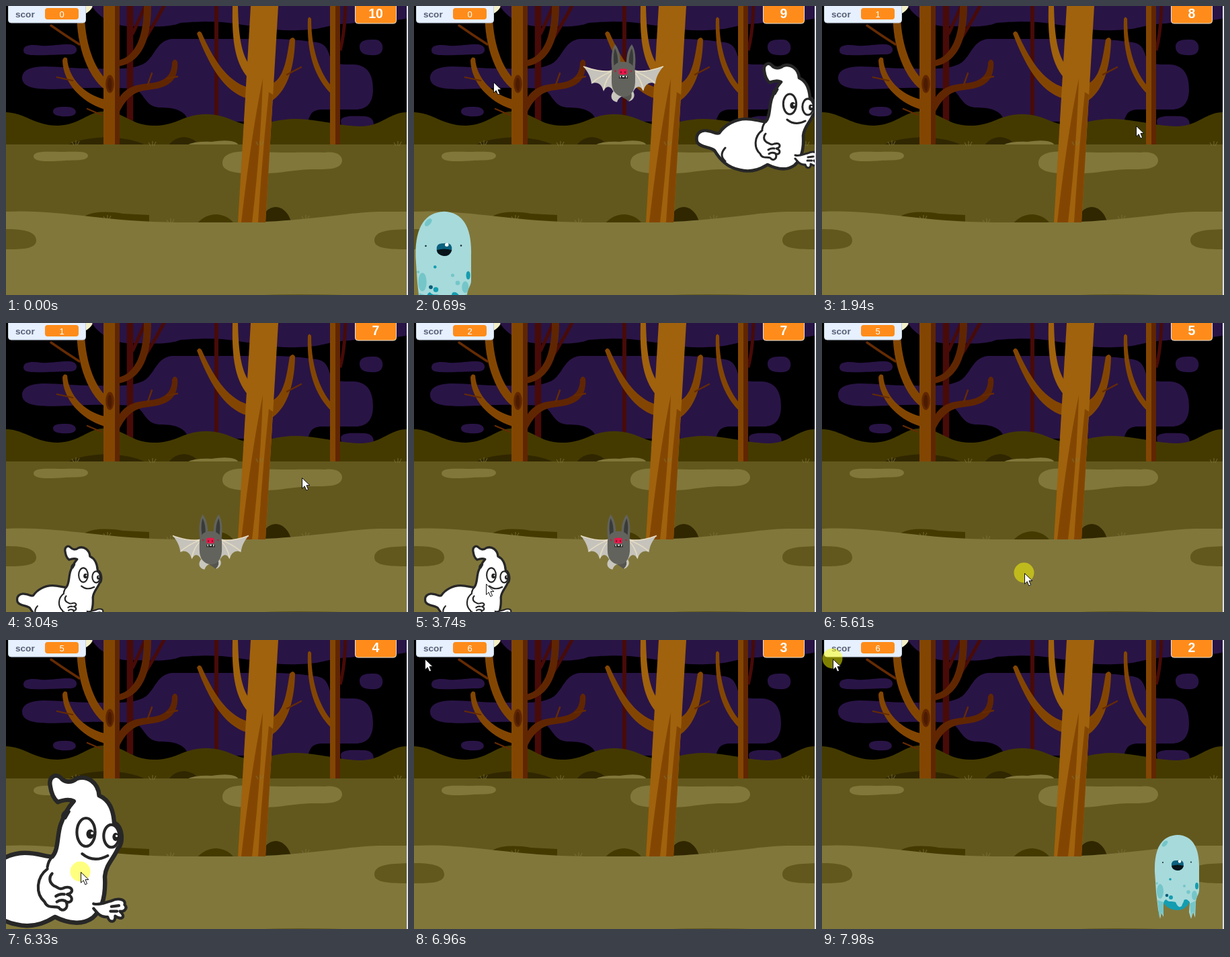
Write an HTML page that moves like this. It is 598 px wide and 430 px high and loops after 8 s.

```html
<!DOCTYPE html>
<html lang="ro">
<head>
<meta charset="utf-8">
<title>Night forest game</title>
<style>
html, body { margin: 0; width: 100%; height: 100%; overflow: hidden; background: #000; }
svg { display: block; width: 598px; height: 430px; }
text { font-family: "Liberation Sans", Arial, sans-serif; }
.cloud { fill: #291446; }
.hill { fill: #443a00; }
.deep { fill: #302700; }
.mid { fill: #62581d; }
.pale { fill: #81773b; }
.wood { fill: #834602; }
.lit { fill: #a0620c; }
.shade { fill: #602602; }
.far { fill: none; stroke: #480b08; }
.twig { fill: none; stroke: #662b03; stroke-linecap: round; }
.ink { fill: #fff; stroke: #272727; stroke-width: 4.6; stroke-linejoin: round; stroke-linecap: round; }
.thin { stroke-width: 3; }
.line { fill: none; }
</style>
</head>
<body>
<svg viewBox="0 0 598 430">
<defs>
  <path id="tuft" d="M0 3L-3-2M3 3V-4M5 3L8-3" fill="none" stroke="#81773b" stroke-width=".8"/>

  <g id="ghost">
    <path class="ink" d="M521 97C519 87 527 83 532 88C536 93 543 94 549 89C560 85 572 93 573 107C584 112 588 122 589 136C598 140 599 158 593 163C590 172 580 180 579 193C580 210 578 227 566 237C555 245 540 243 526 236C515 243 500 248 485 244C465 240 455 228 447 215C440 209 425 211 421 202C418 190 427 183 438 186C446 187 450 191 454 189C462 177 478 168 494 168C508 168 516 172 523 172C530 165 528 150 532 138C536 128 538 122 546 113C540 110 534 112 529 114C524 110 522 104 521 97Z"/>
    <path class="ink line thin" d="M534 129Q535 123 541 124L537 131M463 211Q453 222 463 231M524 171Q519 176 518 183M555 169Q567 179 582 171"/>
    <ellipse class="ink thin" cx="559" cy="146" rx="9.7" ry="15"/>
    <ellipse class="ink thin" cx="586" cy="150" rx="8.2" ry="12"/>
    <ellipse cx="563.5" cy="148" rx="4.2" ry="5" fill="#222"/>
    <ellipse cx="590.5" cy="151" rx="3.4" ry="4.4" fill="#222"/>
    <circle cx="565.5" cy="147" r="1.4" fill="#fff"/>
    <circle cx="591.5" cy="150" r="1.2" fill="#fff"/>
    <path class="ink thin" d="M518 185C506 194 505 211 515 220C518 228 526 224 530 226C534 232 541 227 538 220C544 222 547 215 539 212C547 211 545 202 536 205C530 208 529 204 525 203C519 199 520 193 523 190"/>
    <path class="ink line thin" d="M527 214Q531 211 536 212M528 220Q532 217 537 219"/>
    <path class="ink thin" d="M567 222C574 224 580 220 586 219C594 215 602 218 600 223C604 227 599 231 595 230C602 236 597 240 590 235C591 242 584 243 582 236C575 237 571 232 567 227"/>
    <path class="ink line thin" d="M586 225L594 224M585 230L592 230"/>
  </g>

  <g id="bat">
    <path fill="#c8c6bd" d="M301 124C291 129 291 141 302 143Q304 136 311 134Q318 136 320 142C329 139 331 129 321 123Z"/>
    <path fill="#55544f" d="M310 128L323 129Q326 136 319 142Q315 138 310 136Z"/>
    <g id="wing">
      <path fill="#c5c3bb" d="M252 90C268 96 284 100 297 94V128C293 119 286 117 282 127C279 115 271 112 264 116C263 105 258 97 252 90Z"/>
      <path fill="none" stroke="#e6dcc3" stroke-width="1.7" d="M252 90Q276 99 296 97Q280 102 265 114M296 98Q285 108 282 125"/>
      <path fill="#62625d" d="M295 99C292 78 294 64 299 57C306 65 308 79 307 95Z"/>
      <path fill="#393b39" d="M298 91C296 78 297 68 299 63C303 71 304 80 303 91Z"/>
    </g>
    <use href="#wing" transform="matrix(-1 0 0 1 623 0)"/>
    <path fill="#63635d" d="M294 99Q296 83 311 83Q327 83 329 99V114C328 129 320 136 311 135C301 134 294 126 294 113Z"/>
    <rect x="305" y="93.5" width="12" height="8.5" rx="2" fill="#eb1749"/>
    <path fill="#8d1233" d="M307 97h2v3h-2zM313 97h2v3h-2z"/>
    <circle cx="299.5" cy="97" r="1.4" fill="#a22c42"/>
    <circle cx="323" cy="97" r="1.4" fill="#a22c42"/>
    <path fill="#222" d="M305 104h13v4h-13z"/>
    <path fill="#fff" d="M306 104h2l-1 4zM310 104h3v2h-3zM315 104h2l-1 4z"/>
  </g>

  <g id="monster">
    <path fill="#149db1" d="M507 382H550Q545 401 529 402Q514 402 507 390Z"/>
    <path fill="#a7dadb" d="M495 345C494 310 505 291 529 290C552 291 562 310 561 342V372C561 379 557 380 556 390L555 413L552 405L549 415L546 405L547 390C541 382 538 388 535 396Q530 400 526 390C520 388 516 391 512 386Q508 387 508 394V412L505 406L503 415L500 401L497 375Z"/>
    <g fill="#74c6c9">
      <ellipse cx="510" cy="303" rx="3" ry="5.5" transform="rotate(42 510 303)"/>
      <ellipse cx="503" cy="374" rx="5" ry="11"/>
      <ellipse cx="554" cy="380" rx="4" ry="7"/>
      <circle cx="545" cy="375" r="2.7"/><circle cx="539" cy="366" r="2"/><circle cx="498" cy="362" r="1.7"/>
      <path d="M499 387L508 390V409L505 405L502 413Z M547 392L556 388L554 409L551 404L549 412Z"/>
    </g>
    <g fill="#149db1">
      <ellipse cx="557.5" cy="366" rx="2.5" ry="5"/>
      <circle cx="518" cy="356" r="1.8"/><circle cx="519" cy="383" r="3"/><circle cx="541" cy="389" r="3"/>
    </g>
    <circle cx="513" cy="380" r="2.3" fill="#0b5d78"/>
    <circle cx="507" cy="331" r="1" fill="#10252c"/><circle cx="549" cy="330.5" r="1" fill="#10252c"/>
    <path fill="#0c617e" d="M520 336Q519 327 528 328Q539 326 538 336Q536 343 529 343Q521 342 520 336Z"/>
    <path fill="#071318" d="M520 336Q529 333 538 336Q536 343 529 343Q521 342 520 336Z"/>
    <circle cx="532" cy="329.5" r="2.2" fill="#fff"/>
  </g>
</defs>

<g id="forest">
  <rect width="598" height="430"/>
  <circle cx="107" cy="-11" r="25" fill="#f3efc8"/>
  <g class="cloud">
    <path d="M128 0H598V18C575 24 540 22 512 26C480 27 470 36 435 36C400 38 370 30 345 27C310 21 280 24 260 25C240 33 210 30 188 30C165 32 138 18 128 0Z"/>
    <path d="M26 66C26 57 40 57 52 59C68 60 75 57 94 57C108 57 109 72 96 72C72 72 60 74 40 73C31 73 26 71 26 66Z"/>
    <path d="M24 107C24 95 38 90 58 90C80 90 100 93 125 93C160 93 190 96 208 84C222 73 225 51 247 49H390C420 49 440 51 462 54C474 56 478 62 482 76C487 88 500 87 517 87C540 88 546 105 546 124C546 145 536 154 520 154H475C455 153 453 160 449 172H271C268 155 250 151 228 151C205 150 206 125 188 123C145 121 120 122 94 123C65 124 24 127 24 107Z"/>
    <path d="M526 61C526 49 540 50 549 50C563 50 565 72 550 73C535 74 526 71 526 61Z"/>
    <path d="M70 157C70 150 80 150 91 150C106 150 109 163 94 164C80 165 70 163 70 157Z"/>
    <path d="M498 171C498 162 520 164 532 164C548 164 550 177 543 184H505Q498 180 498 171Z"/>
  </g>
  <path class="far" stroke-width="9.5" d="M184.5 0V175"/>
  <path class="far" stroke-width="6" d="M313 0V166"/>
  <path class="far" stroke-width="5" d="M188 42Q196 25 207 0M187 78Q214 40 236 -2M497 66Q504 40 505 -2"/>

  <path class="hill" d="M0 158C28 159 43 178 77 178C110 177 122 157 145 157C177 157 185 178 220 178C255 178 263 161 298 161C330 161 342 177 366 177C390 175 405 168 430 168C465 168 495 179 530 179C560 178 570 158 598 158V208H0Z"/>
  <path class="deep" d="M91 207Q113 196 150 195Q190 197 207 207ZM242 207Q251 195 266 195Q279 196 287 207Z"/>
  <path class="pale" d="M269 207Q280 201 306 202Q340 197 346 207Z"/>

  <rect class="mid" y="206" width="598" height="130"/>
  <g class="pale">
    <path d="M41 224C41 215 61 217 82 217C102 217 122 215 122 223C121 231 102 229 87 230C62 232 41 232 41 224Z"/>
    <path d="M322 234C322 215 350 215 380 217C420 219 445 217 475 218C491 216 500 222 500 230C499 243 480 243 460 243C425 243 410 250 375 249C345 250 322 247 322 234Z"/>
  </g>

  <!-- left tree -->
  <g class="wood">
    <path d="M106 0H117C115 45 128 88 148 108V125C119 104 102 50 106 0Z"/>
    <path d="M84 81Q86 74 91 78C93 108 117 132 147 139V154C109 142 85 112 84 81Z"/>
  </g>
  <g class="shade">
    <path d="M205 0H216C216 48 203 84 167 90V81C193 75 205 45 205 0Z"/>
    <path d="M247 84Q251 76 255 83C258 123 224 123 204 126C188 129 177 140 168 159V137C181 117 199 117 213 115C235 113 247 104 247 84Z"/>
  </g>
  <path class="twig" stroke-width="3.5" d="M67 29Q87 43 109 57"/>
  <path class="twig" stroke-width="2.3" d="M76 106L99 111M121 153L142 162M211 117L217 100M239 108L255 105"/>
  <rect class="wood" x="145" width="24" height="206"/>
  <rect class="shade" x="162" width="7" height="206"/>
  <ellipse cx="154.5" cy="116" rx="6.3" ry="13.5" class="shade"/>
  <path fill="#4b1b01" d="M151 116Q152 104 156 108Q159 116 156 127Q151 125 151 116Z"/>

  <!-- right tree -->
  <path class="wood" d="M449 19Q451 14 454 19C454 70 470 103 484 119V131C460 107 447 73 449 19Z"/>
  <rect class="wood" x="482" width="15" height="206"/>
  <rect class="shade" x="490" width="7" height="206"/>

  <path class="hill" d="M118 312Q137 303 174 309L213 311V326H118ZM284 324Q296 310 313 310Q331 311 341 326Z"/>
  <path class="deep" d="M380 326Q383 299 402 299Q419 301 425 324Z"/>
  <path class="pale" d="M0 306C80 302 140 321 260 322H340C440 322 510 306 560 306H598V430H0Z"/>

  <!-- front tree -->
  <path class="lit" d="M337 0H345C346 45 350 74 365 91L361 108C338 83 336 41 337 0Z"/>
  <g class="wood">
    <path d="M284 41Q287 35 291 40C307 76 328 112 360 121V138C323 128 301 85 284 41Z"/>
    <path d="M422 50Q427 44 430 50C429 96 416 129 394 142L397 115C415 105 418 73 422 50Z"/>
  </g>
  <path class="twig" stroke-width="2.5" d="M418 102L439 91"/>
  <path class="lit" d="M364 0H405L386 322H345Z"/>
  <path class="wood" d="M382 108Q365 190 350 322H366Q379 210 382 108ZM391 128L397 132L386 322H375Q381 224 391 128Z"/>

  <path class="mid" d="M0 332C22 332 45 334 45 349C45 362 22 362 0 362ZM598 332C570 333 548 334 548 349C548 361 570 362 598 362ZM385 430Q430 428 500 430Z"/>
</g>

<g id="cast"></g>

<g>
  <rect x="3.5" y="-7" width="115" height="32" rx="4" fill="#e6f0ff" stroke="#c7d1e1"/>
  <text x="14" y="17" font-size="13.6" font-weight="700" fill="#575e75">scor</text>
  <rect x="58" y="3" width="50" height="17" rx="4" fill="#ff8c1a"/>
  <text id="score" x="83" y="16.5" font-size="13" fill="#fff" text-anchor="middle">0</text>
  <rect x="519.5" y="-7" width="61" height="33" rx="4" fill="#ff8c1a" stroke="#e6e3df"/>
  <text id="clock" x="550" y="17.5" font-size="19.5" font-weight="700" fill="#fff" text-anchor="middle">10</text>
</g>
<rect x="596" width="2" height="430" fill="#dfe2e8"/>
<g id="pointer">
  <circle id="glow" cx="-.5" cy="-.5" r="15" fill="#ff0" fill-opacity=".5"/>
  <path d="M.5 .5V16.2L4.2 12.7L6.8 18.9L9.6 17.7L7 11.6H12Z" fill="#fff" stroke="#111"/>
</g>
</svg>

<script>
const LOOP = 8000, SVG = 'http://www.w3.org/2000/svg';
const $ = id => document.getElementById(id);

function add(parent, ref, transform) {
  const el = document.createElementNS(SVG, 'use');
  el.setAttribute('href', '#' + ref);
  el.setAttribute('transform', transform);
  return parent.appendChild(el);
}

for (const [x, y] of [[101, 204], [215, 205], [375, 204], [580, 205], [148, 315], [242, 320], [443, 315]])
  add($('forest'), 'tuft', `translate(${x} ${y})`);

// Anchor points: eye of the ghost, nose of the bat, mouth of the monster
const anchors = { ghost: [559, 146], bat: [311, 98], monster: [529, 335] };

// kind, x, y, scale, shown from, shown until
const cast = [
  ['monster', 45, 362, 1.25, 650, 1710],
  ['bat', 311, 98, 1, 650, 1630],
  ['ghost', 559, 146, 1, 650, 1710],
  ['bat', 304, 324, .95, 2810, 4380],
  ['ghost', 115, 375, .71, 2810, 3890],
  ['ghost', 119, 286, 1.4, 5850, 6400],
  ['monster', 529, 335, 1, 7860, LOOP]
].map(([kind, x, y, s, from, to]) => {
  const [ax, ay] = anchors[kind];
  const el = add($('cast'), kind, `translate(${x} ${y}) scale(${s}) translate(${-ax} ${-ay})`);
  return { el, from, to };
});

// Times at which each counter moves on by one
const hits = [1630, 3300, 3890, 4380, 5540, 6400];
const ticks = [650, 1710, 2810, 3820, 4830, 5850, 6880, 7860];
const clicks = [[1630, 1710], [3300, 3380], [3820, 3960], [4300, 4450], [5540, 5620], [6330, 6570], [7940, LOOP]];

// time, x, y
const path = [
  [380, 4, 60], [690, 118, 113], [780, 118, 113], [850, 125, 106], [1010, 125, 106],
  [1250, 230, 171], [1480, 314, 125], [1630, 314, 125], [1940, 467, 178], [2030, 467, 178],
  [2330, 440, 230], [3040, 440, 230], [3300, 390, 285], [3740, 107, 388], [3890, 107, 388],
  [4300, 304, 330], [4380, 304, 330], [4590, 293, 335], [4840, 293, 335], [4910, 297, 340],
  [5140, 297, 340], [5260, 334, 392], [5370, 325, 375], [5540, 325, 375], [6170, 111, 345],
  [6570, 111, 345], [6960, 16, 28], [LOOP, 16, 28]
];

const passed = (list, t) => list.filter(at => t >= at).length;
const within = (t, from, to) => t >= from && t < to;
const show = (el, on) => el.setAttribute('visibility', on ? 'visible' : 'hidden');

function pointerAt(t) {
  const i = Math.max(1, path.findIndex(p => p[0] > t));
  const [t0, x0, y0] = path[i - 1], [t1, x1, y1] = path[i];
  const k = Math.max(0, (t - t0) / (t1 - t0));
  return [x0 + (x1 - x0) * k, y0 + (y1 - y0) * k].map(Math.round);
}

function draw(t) {
  for (const c of cast) show(c.el, within(t, c.from, c.to));
  $('score').textContent = passed(hits, t);
  $('clock').textContent = 10 - passed(ticks, t);
  $('pointer').setAttribute('transform', `translate(${pointerAt(t)})`);
  $('pointer').style.display = t < 380 ? 'none' : '';
  show($('glow'), clicks.some(([from, to]) => within(t, from, to)));
}

const start = performance.now();
function frame() {
  draw((performance.now() - start) % LOOP);
  requestAnimationFrame(frame);
}
frame();
</script>
</body>
</html>
```
